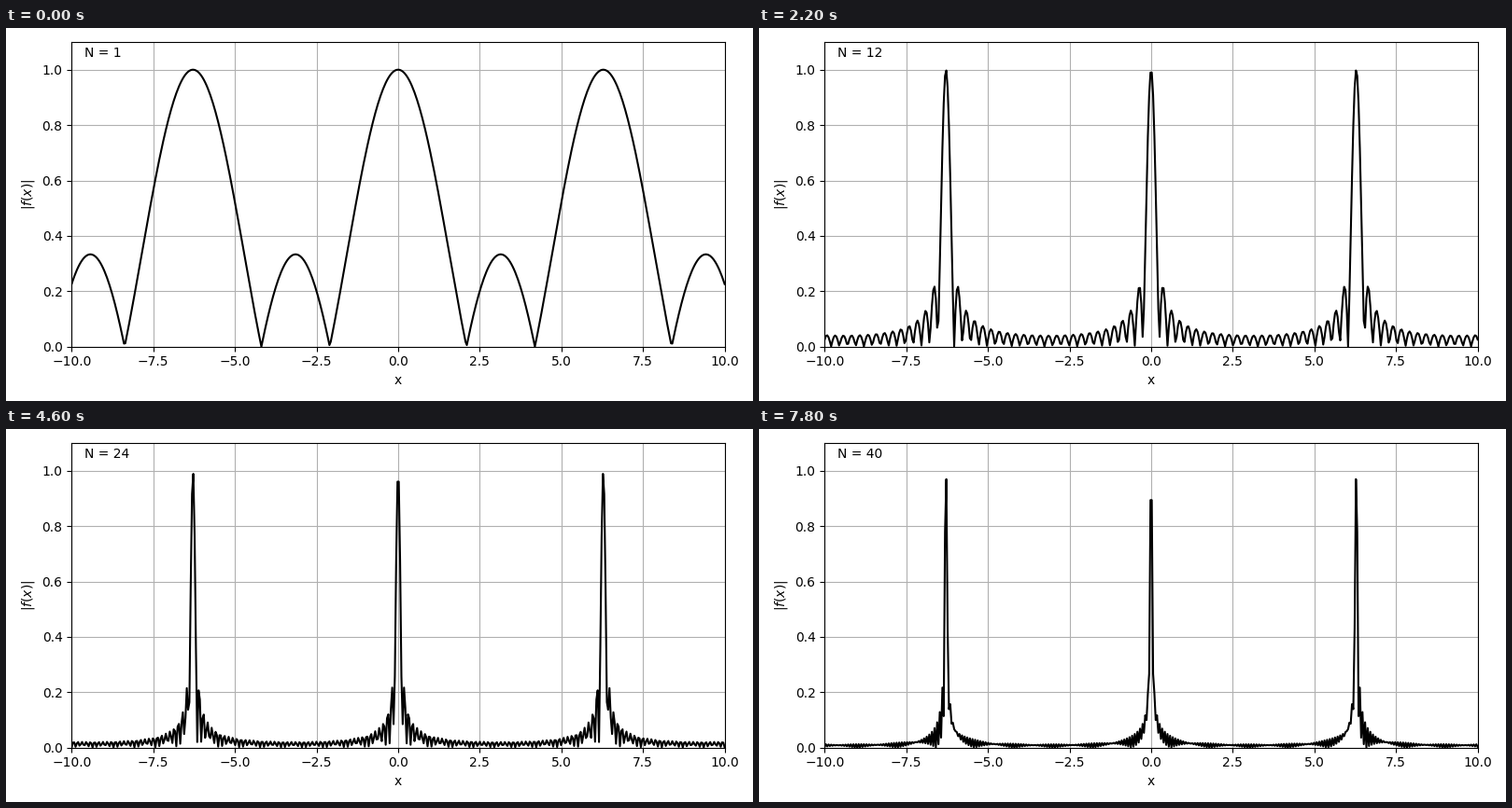
A matplotlib script for the animation above (8 s loop, 800 by 400 pixels).

```python
import numpy as np
import matplotlib.pyplot as plt
from matplotlib.animation import FuncAnimation

STEPS = 40
x = np.linspace(-10, 10, 500)


def kernel(n):
    """Normalised magnitude of the Dirichlet kernel of order n."""
    m = 2 * n + 1
    return np.abs(np.sin(m * x / 2) / (m * np.sin(x / 2)))


fig, ax = plt.subplots(figsize=(8, 4), dpi=100)
line, = ax.plot(x, kernel(1), color="black", lw=1.5)
label = ax.text(0.02, 0.95, "N = 1", transform=ax.transAxes)
ax.set_xlim(-10, 10)
ax.set_ylim(0, 1.1)
ax.set_xlabel("x")
ax.set_ylabel(r"$|f(x)|$")
ax.grid(True)
fig.tight_layout()


def update(frame):
    n = frame + 1
    line.set_ydata(kernel(n))
    label.set_text(f"N = {n}")
    return line, label


anim = FuncAnimation(fig, update, frames=STEPS, interval=200,
                     repeat=True, repeat_delay=0, blit=False)
plt.show()
```
